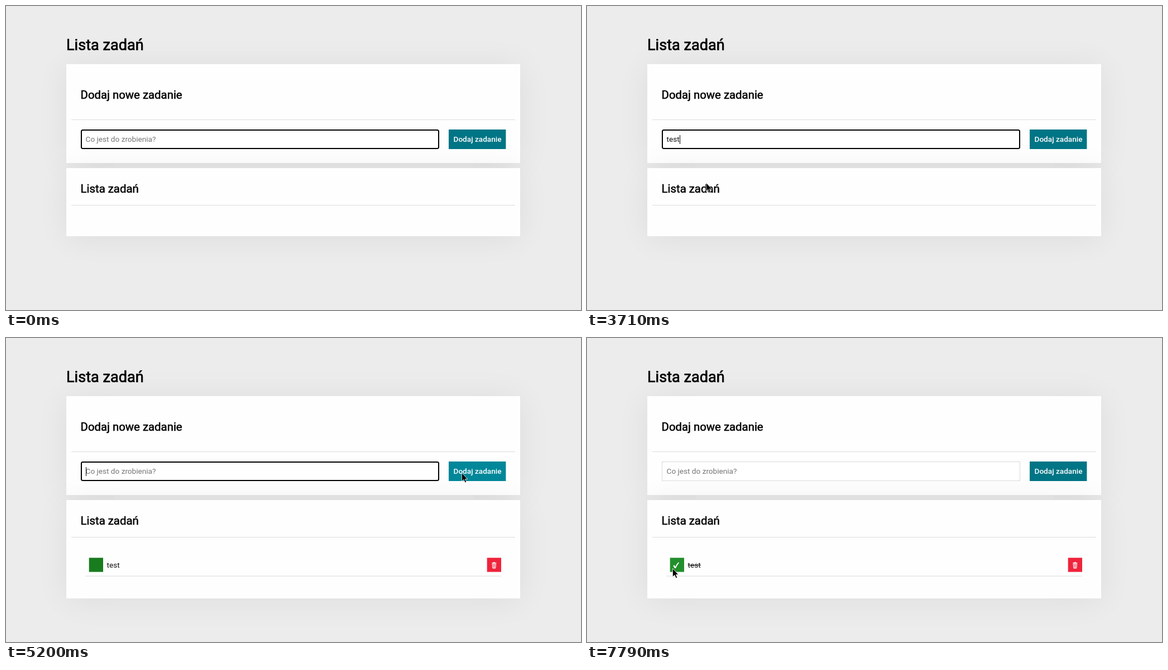
These frames come from a looping animation (1030x544 px, 8000 ms). An HTML page:

```html
<!DOCTYPE html>
<html lang="pl">
<head>
<meta charset="utf-8">
<title>Lista zadań</title>
<style>
  html, body { margin: 0; width: 100%; height: 100%; overflow: hidden; background: #ececec; }
  .panel {
    position: absolute; left: 108px; width: 813px;
    background: #fefefe; box-shadow: 0 4px 56px rgba(0, 0, 0, .067);
  }
  #form { top: 104px; height: 177px; }
  #list { top: 290px; height: 122px; }
  svg { position: absolute; left: 0; top: 0; }
  text { font: 13.6px Roboto, sans-serif; fill: #111; white-space: pre; }
  .h1, .h2 { fill: #000; stroke: #000; }
  .h1 { font-size: 27.1px; stroke-width: .7px; }
  .h2 { font-size: 20.35px; stroke-width: .55px; }
  .rule { fill: #dcdcdc; }
</style>
</head>
<body>
<div class="panel" id="form"></div>
<div class="panel" id="list"></div>
<svg width="1030" height="544" viewBox="0 0 1030 544">
  <text class="h1" x="108" y="79">Lista zadań</text>
  <text class="h2" x="133.6" y="166">Dodaj nowe zadanie</text>
  <rect class="rule" x="117" y="203" width="795" height="1"/>
  <text class="h2" x="133.6" y="334">Lista zadań</text>
  <rect class="rule" x="117" y="356" width="795" height="1"/>

  <rect id="blurred" x="134.5" y="221.5" width="641" height="34" fill="#fff" stroke="#d9d9d9"/>
  <rect id="focused" x="135" y="222" width="640" height="33" rx="2.5" fill="#fff" stroke="#000" stroke-width="2"/>
  <text id="hint" x="142.6" y="243" style="fill:#757575">Co jest do zrobienia?</text>
  <text id="typed" x="142.6" y="243"></text>
  <rect id="caret" y="231" width="1" height="16"/>

  <rect id="add" x="793" y="221" width="102.4" height="35"/>
  <text x="801.5" y="243" style="fill:#fff;font-weight:500">Dodaj zadanie</text>

  <g id="task">
    <rect id="toggle" x="148.7" y="393.3" width="25.3" height="25.3"/>
    <path id="check" d="M154.3 407.6L156.4 406.2L158.2 409.2Q160.3 404.4 163.8 401.2L165 402.2Q161.2 406.5 159 412H157Z" fill="#fff"/>
    <text x="180.6" y="411">test</text>
    <rect id="strike" x="180.6" y="406.3" width="23.5" height="1" fill="#111"/>
    <rect x="861.7" y="393.3" width="25.3" height="25.3" fill="#ef233c"/>
    <path d="M870 402.6H878.6M872.6 401.4H876M871 404L871.8 412H876.8L877.6 404ZM873.2 404L873.5 412M875.4 404L875.1 412" fill="none" stroke="#fff" stroke-width="1"/>
    <rect class="rule" x="142" y="425.5" width="745" height="1"/>
  </g>

  <path id="pointer" d="M.4 .4V15.6L3.9 12.3L6.3 17.8L8.7 16.8L6.4 11.4H10.8Z" stroke="#fff" stroke-width=".8"/>
</svg>
<script>
const LOOP = 8000, STEP = 70, BLINK = 530;
const KEYS = [1960, 2030, 2230, 2370];
const PRESS = 5130, ADD = 5200, BLUR = 7590, DONE = 7790;
const RESETS = [170 - 2 * BLINK, ...KEYS, ADD];
// pointer tip: time, x, y
const PATH = [
  [3490, 54, 342], [3700, 213, 316], [4190, 585, 317], [4540, 802, 243], [4610, 816, 241],
  [5730, 816, 241], [6430, 275, 384], [6640, 155, 413], [6990, 153, 412]
];

const $ = id => document.getElementById(id);
const show = (id, on) => $(id).style.display = on ? "" : "none";

function tipAt(t) {
  const i = PATH.findIndex(p => p[0] > t);
  const [t1, x1, y1] = PATH.at(i < 0 ? -1 : i);
  const [t0, x0, y0] = PATH.at(i < 0 ? -1 : Math.max(i - 1, 0));
  const f = (t - t0) / (t1 - t0 || 1);
  return i < 0 ? [x1, y1] : [x0 + (x1 - x0) * f, y0 + (y1 - y0) * f].map(Math.round);
}

function draw(t) {
  // the pointer moves in steps
  const start = PATH[0][0];
  const held = start + Math.floor((t - start) / STEP) * STEP;
  const visible = t >= start;
  const [x, y] = tipAt(held);
  const inside = (l, top, r, b) => visible && x >= l && x <= r && y >= top && y <= b;
  show("pointer", visible);
  $("pointer").setAttribute("transform", `translate(${x} ${y})`);

  const added = t >= ADD, done = t >= DONE, focus = t < BLUR;
  const text = added ? "" : "test".slice(0, KEYS.filter(k => k <= t).length);
  $("typed").textContent = text;
  show("hint", !text);
  show("focused", focus);
  show("blurred", !focus);

  const idle = t - RESETS.findLast(r => r <= t);
  show("caret", focus && idle % (2 * BLINK) < BLINK);
  $("caret").setAttribute("x", Math.round(142.6 + (text ? $("typed").getComputedTextLength() : 0)));

  const pressed = t >= PRESS && !added;
  $("add").style.fill = pressed ? "#009db3" : inside(793, 221, 895, 256) ? "#008799" : "#007585";

  $("list").style.height = (added ? 176 : 122) + "px";
  show("task", added);
  $("toggle").style.fill = inside(148, 393, 174, 418) ? "#238f2c" : "#187c1f";
  show("check", done);
  show("strike", done);
}

function tick() {
  draw(performance.now() % LOOP);
  requestAnimationFrame(tick);
}
tick();
</script>
</body>
</html>
```
